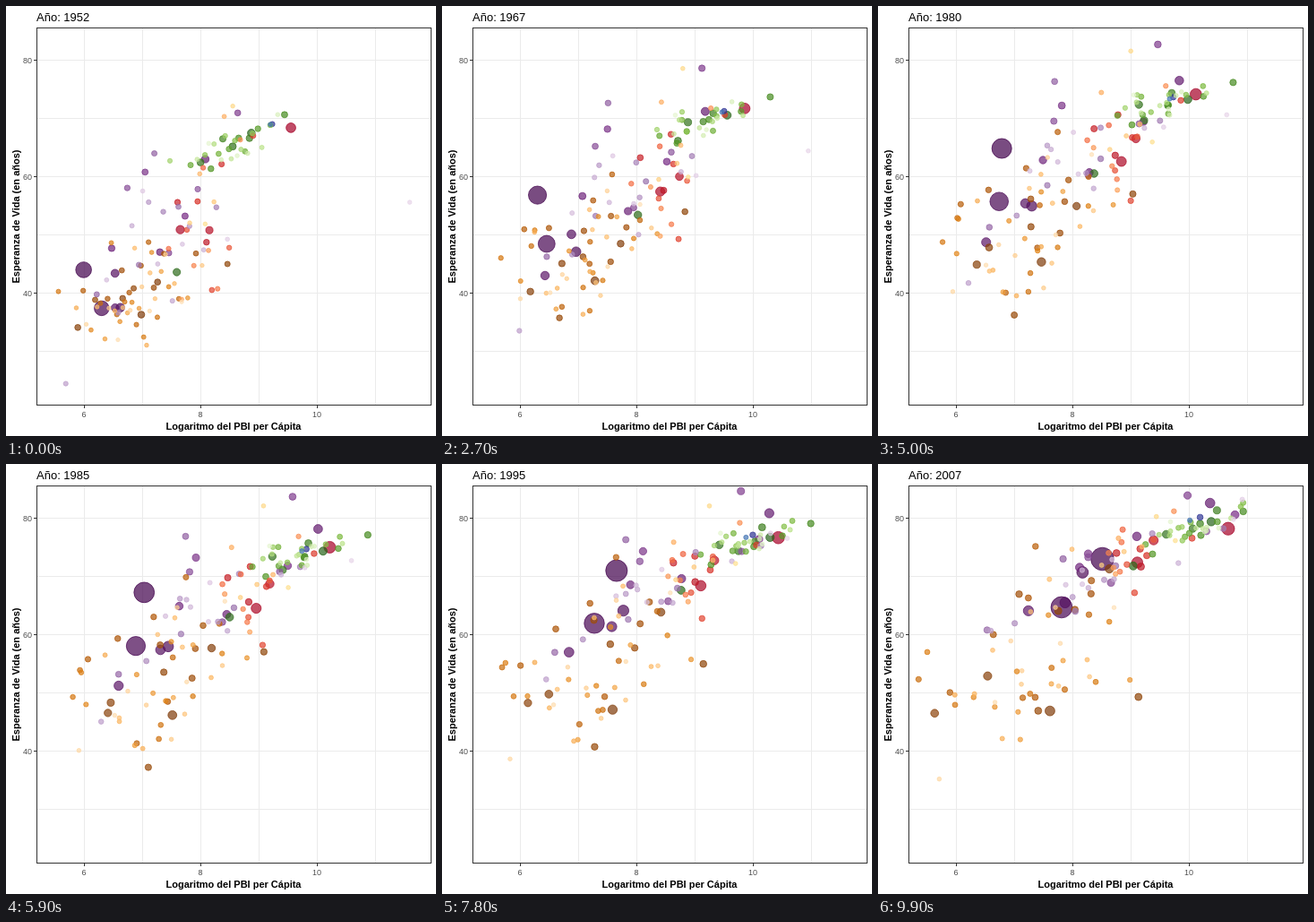
An HTML page with a canvas that plays this animation: 480x480 px, repeating every 10 s.

```html
<!DOCTYPE html>
<html lang="es">
<head>
<meta charset="utf-8">
<title>Esperanza de vida y PBI</title>
<style>
html, body { margin: 0; width: 100%; height: 100%; overflow: hidden; background: #fff; }
canvas { display: block; width: 480px; height: 480px; }
</style>
</head>
<body>
<canvas id="stage" width="480" height="480"></canvas>
<script>
const ctx = document.getElementById('stage').getContext('2d');
const LOOP = 10000, STEP = 100, LAST = 99;
const px = x => 87 + (x - 6) * 65;
const py = y => 320.5 - (y - 40) * 6.5;
const mix = (a, b, k) => a + (b - a) * k;

// Each family is a cloud around a rising trend, plus a few leading dots.
// start, end: mean income, spread, mean life, life per income, scatter.
// bump: mid-time offset of income and life, and its scatter.
// lead: population, then (income, life) at the first, middle and last year.
const families = [
  {
    stops: ['40004b', '762a83', '9970ab', 'c2a5cf', 'e7d4e8'],
    count: 26, pop: 88, decay: .88, young: .4,
    start: [7.3, .75, 47, 5, 7], end: [8.75, 1, 70.5, 4.5, 3.5], bump: [.1, 2.8, 2.5],
    lead: [
      [1319, 5.99, 44, 6.77, 64.7, 8.51, 73],
      [1110, 6.3, 37.4, 6.73, 55.6, 7.81, 64.7],
      [224, 6.62, 37.5, 7.29, 54.8, 8.17, 70.7],
      [169, 6.53, 43.4, 7.18, 55.3, 7.87, 65.5],
      [150, 6.53, 37.5, 6.51, 48.6, 7.24, 64.1],
      [127, 8.08, 63, 9.82, 76.4, 10.36, 82.6],
      [2.5, 11.59, 55.6, 10.65, 70.5, 10.76, 79.8]
    ]
  },
  {
    stops: ['276419', '4d9221', '7fbc41', 'b8e186', 'e6f5d0'],
    count: 28, pop: 61, decay: .87, young: .72,
    start: [8.55, .5, 65.5, 6, 2], end: [10.05, .5, 78, 4, 1.2], bump: [.2, 1.2, 1],
    lead: [
      [82, 8.87, 67.5, 9.97, 73.2, 10.38, 79.4],
      [71, 7.59, 43.6, 8.36, 60.4, 9.04, 71.8]
    ]
  },
  {
    stops: ['a50026', 'd73027', 'f46d43', 'fdae61', 'fee090'],
    count: 22, pop: 44, decay: .86, young: .43,
    start: [8.1, .45, 52.5, 9, 6], end: [8.85, .55, 73.3, 3, 2.5], bump: [.18, 2, 2],
    lead: [
      [301, 9.55, 68.4, 10.11, 74.1, 10.67, 78.2],
      [190, 7.65, 50.9, 8.83, 62.5, 9.11, 72.4],
      [109, 8.15, 50.8, 9.08, 66.4, 9.39, 76.2]
    ]
  },
  {
    stops: ['7f3b08', 'b35806', 'e08214', 'fdb863', 'fee0b6'],
    count: 47, pop: 44, decay: .92, young: .28,
    start: [6.85, .6, 39, 2.5, 4.5], end: [7.25, .8, 54.5, 4, 7], bump: [.17, 3.5, 4.5],
    lead: [
      [135, 6.98, 36.3, 7.46, 45.3, 7.61, 46.9],
      [80, 7.26, 41.9, 8.06, 54.8, 8.63, 71.3],
      [77, 5.89, 34.1, 6.35, 44.8, 6.54, 52.9],
      [65, 6.66, 39.1, 6.57, 47.8, 5.63, 46.5],
      [44, 8.46, 45, 9.03, 57, 9.13, 49.3]
    ]
  },
  {
    stops: ['313695', '4575b4'],
    count: 2, pop: 20, decay: .2, young: .45,
    start: [9.23, .03, 69.2, 0, .2], end: [10.29, .2, 80.7, 3, .2], bump: [.04, -1, 0],
    lead: []
  }
];

function randomFrom(seed) {
  return () => (seed = (seed * 16807) % 2147483647) / 2147483647;
}
const rnd = randomFrom(1952);
const bell = () => (rnd() + rnd() + rnd() + rnd() - 2) * 1.7;

function cloudDot(f, i) {
  const p = (i * .618 + .5) % 1;
  const rich = Math.log((p + .02) / (1.02 - p)) / 1.7;
  const fit = bell(), drift = bell();
  const place = ([mean, spread, life, slope, scatter], u, v) => {
    const dx = spread * u;
    return [mean + dx, life + slope * dx + scatter * v];
  };
  const [x0, y0] = place(f.start, rich, fit);
  const [x1, y1] = place(f.end, .8 * rich + .6 * drift, .6 * fit + .8 * bell());
  const [bx, by, scatter] = f.bump;
  return [f.pop * f.decay ** i, x0, y0,
    (x0 + x1) / 2 + bx * (1 + bell()), (y0 + y1) / 2 + by + scatter * bell(), x1, y1];
}

function shade(stops, k) {
  const p = k * (stops.length - 1), i = Math.min(Math.floor(p), stops.length - 2);
  const part = (hex, c) => parseInt(hex.slice(c, c + 2), 16);
  const rgb = [0, 2, 4].map(c =>
    Math.round(mix(part(stops[i], c), part(stops[i + 1], c), p - i)));
  return `rgba(${rgb},0.7)`;
}

// Smooth track through a first, middle and last value.
const track = (a, m, b) => s => mix(a, b, s) + (4 * m - 2 * (a + b)) * s * (1 - s);

function makeDots(f) {
  const cloud = Array.from({ length: f.count }, (_, i) => cloudDot(f, i));
  const all = f.lead.concat(cloud).sort((a, b) => b[0] - a[0]);
  return all.map(([pop, x0, y0, xm, ym, x1, y1], i) => ({
    pop, young: f.young,
    x: track(x0, xm, x1),
    y: track(y0, ym, y1),
    color: shade(f.stops, i / (all.length - 1))
  }));
}

const dots = families.flatMap(makeDots).sort((a, b) => b.pop - a.pop);

function line(x0, y0, x1, y1, color) {
  ctx.strokeStyle = color;
  ctx.lineWidth = 1;
  ctx.beginPath();
  ctx.moveTo(x0, y0);
  ctx.lineTo(x1, y1);
  ctx.stroke();
}

function text(str, x, y, font, color, align) {
  ctx.font = font + ' "Liberation Sans", Arial, sans-serif';
  ctx.fillStyle = color;
  ctx.textAlign = align;
  ctx.fillText(str, x, y);
}

function drawGrid() {
  const grid = '#ebebeb';
  for (let v = 6; v <= 11; v++) line(px(v) + .5, 25, px(v) + .5, 445, grid);
  for (let v = 30; v <= 80; v += 10) line(35, py(v), 474, py(v), grid);
}

function drawAxes() {
  ctx.strokeStyle = '#333';
  ctx.lineWidth = 1;
  ctx.strokeRect(34.5, 24.5, 440, 421);
  for (const v of [6, 8, 10]) {
    line(px(v) + .5, 446, px(v) + .5, 449, '#333');
    text(v, px(v), 459, '9px', '#4d4d4d', 'center');
  }
  for (const v of [40, 60, 80]) {
    line(31, py(v), 34, py(v), '#333');
    text(v, 29, Math.round(py(v) + 3.5), '9px', '#4d4d4d', 'right');
  }
  text('Logaritmo del PBI per Cápita', 254, 473, 'bold 11px', '#000', 'center');
  ctx.save();
  ctx.translate(15, 235);
  ctx.rotate(-Math.PI / 2);
  text('Esperanza de Vida (en años)', 0, 0, 'bold 11px', '#000', 'center');
  ctx.restore();
}

function drawDot(d, s) {
  const r = 2 + .297 * Math.sqrt(d.pop * mix(d.young, 1, s));
  ctx.beginPath();
  ctx.arc(px(d.x(s)) + .3, py(d.y(s)), r, 0, Math.PI * 2);
  ctx.fillStyle = ctx.strokeStyle = d.color;
  ctx.lineWidth = 1;
  ctx.fill();
  ctx.stroke();
}

function render(now) {
  const s = Math.floor((now % LOOP) / STEP) / LAST;
  ctx.fillStyle = '#fff';
  ctx.fillRect(0, 0, 480, 480);
  drawGrid();
  dots.forEach(d => drawDot(d, s));
  drawAxes();
  text('Año: ' + Math.round(1952 + 55 * s), 34, 17, '13px', '#000', 'left');
  requestAnimationFrame(render);
}
requestAnimationFrame(render);
</script>
</body>
</html>
```
